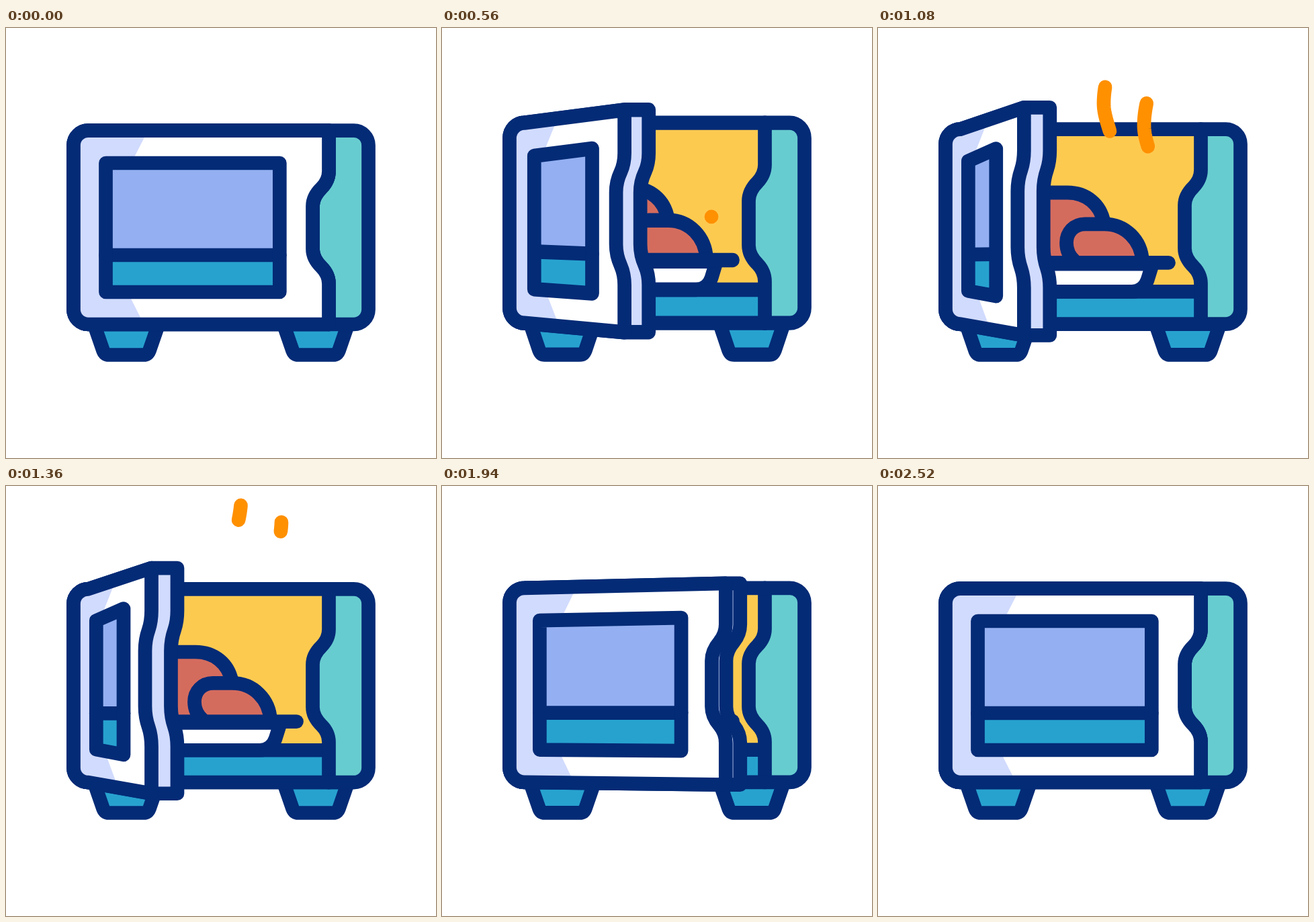
Animation of 640x640 px, one loop 2.74 s. Source, as an HTML page with a canvas:

```html
<!DOCTYPE html>
<html lang="en">
<head>
<meta charset="utf-8">
<title>Microwave</title>
<style>
html, body { margin: 0; width: 100%; height: 100%; overflow: hidden; background: #fff; }
canvas { display: block; width: 640px; height: 640px; }
</style>
</head>
<body>
<canvas id="stage" width="640" height="640"></canvas>
<script>
const ctx = document.getElementById('stage').getContext('2d');
const LOOP = 2740, GROUND = 497, STROKE = 20.7;
const LEFT = 100.5, RIGHT = 539.5, TOP = 152.6, BOTTOM = 441, RADIUS = 22;
const DOOR_WIDTH = 380, DOOR_DEPTH = 40.4;
const NAVY = '#042b76', YELLOW = '#fdca50', RED = '#d46c5e', BLUE = '#27a2cf',
  LAVENDER = '#d1dbfd', GLASS = '#94b0f2', ORANGE = '#ff9000', TEAL = '#67ccd0';

const mix = (a, b, u) => a + (b - a) * u;

// Monotone cubic interpolation through [time, value] keys
function track(keys) {
  const n = keys.length;
  const secant = i => (keys[i + 1][1] - keys[i][1]) / (keys[i + 1][0] - keys[i][0]);
  const slope = keys.map((_, i) => {
    if (i === 0 || i === n - 1) return 0;
    const a = secant(i - 1), b = secant(i);
    return a * b <= 0 ? 0 : 2 * a * b / (a + b);
  });
  return t => {
    if (t <= keys[0][0]) return keys[0][1];
    if (t >= keys[n - 1][0]) return keys[n - 1][1];
    let i = 0;
    while (t > keys[i + 1][0]) i++;
    const d = keys[i + 1][0] - keys[i][0], u = (t - keys[i][0]) / d, v = 1 - u;
    return keys[i][1] * (1 + 2 * u) * v * v + slope[i] * d * u * v * v
      + keys[i + 1][1] * u * u * (3 - 2 * u) - slope[i + 1] * d * u * u * v;
  };
}

const stretch = track([[220, 1], [390, .97], [580, 1.035], [860, .983], [1090, 1.006],
  [1360, .998], [1540, .98], [1720, 1.0225], [1820, 1.038], [2030, .98],
  [2160, 1.003], [2310, 1.012], [2520, 1]]);
const opening = track([[290, 0], [560, .79], [700, .9], [860, .96], [1150, 1],
  [1680, 1], [1720, .994], [2040, 0]]);
const edgeLag = track([[300, 0], [560, -6], [860, 6], [1150, 0]]);
const steamHead = track([[590, 0], [860, .4], [1280, .915], [1360, .96], [1400, 1]]);
const steamTail = track([[620, 0], [875, .166], [1360, .864], [1430, 1]]);

function stroke(color = NAVY) {
  ctx.strokeStyle = color;
  ctx.stroke();
}

function fill(color) {
  ctx.fillStyle = color;
  ctx.fill();
}

function polygon(...points) {
  ctx.beginPath();
  points.forEach(p => ctx.lineTo(...p));
  ctx.closePath();
}

function line(x1, y1, x2, y2) {
  ctx.beginPath();
  ctx.moveTo(x1, y1);
  ctx.lineTo(x2, y2);
  stroke();
}

// Wavy vertical edge, drawn downwards from the current point
function wave(x, bottom, bend, rise, drop) {
  const y1 = 213 - .9 * rise, y2 = 265 - .65 * rise;
  const y3 = 329 - .1 * drop, y4 = 381 + .4 * drop;
  const h = y2 - y1, k = y4 - y3;
  ctx.lineTo(x, y1);
  ctx.bezierCurveTo(x, y1 + .25 * h, x - .28 * bend, y1 + .4 * h, x - .45 * bend, y1 + .48 * h);
  ctx.bezierCurveTo(x - .83 * bend, y1 + .65 * h, x - bend, y1 + .82 * h, x - bend, y2);
  ctx.lineTo(x - bend, y3);
  ctx.bezierCurveTo(x - bend, y4 - .82 * k, x - .83 * bend, y4 - .65 * k, x - .45 * bend, y4 - .48 * k);
  ctx.bezierCurveTo(x - .28 * bend, y4 - .4 * k, x, y4 - .25 * k, x, y4);
  ctx.lineTo(x, bottom);
}

function drawFoot(x) {
  ctx.beginPath();
  ctx.moveTo(x + 131, 441);
  ctx.lineTo(x + 144.5, 480);
  ctx.quadraticCurveTo(x + 147, 486.5, x + 153, 486.5);
  ctx.lineTo(x + 205, 486.5);
  ctx.quadraticCurveTo(x + 211, 486.5, x + 213.5, 480);
  ctx.lineTo(x + 227, 441);
  fill(BLUE);
  stroke();
}

function drawFood() {
  ctx.beginPath();
  ctx.moveTo(200, 350);
  ctx.lineTo(200, 246.5);
  ctx.lineTo(282, 246.5);
  ctx.bezierCurveTo(310, 246.5, 331, 264, 336, 290);
  ctx.lineTo(330, 350);
  fill(RED);
  ctx.beginPath();
  ctx.moveTo(200, 246.5);
  ctx.lineTo(282, 246.5);
  ctx.bezierCurveTo(310, 246.5, 331, 264, 336, 290);
  stroke();

  ctx.beginPath();
  ctx.moveTo(293, 348);
  ctx.bezierCurveTo(285, 341, 280.5, 332, 280.5, 321);
  ctx.bezierCurveTo(280.5, 305, 292, 293, 308, 293);
  ctx.lineTo(337, 293);
  ctx.bezierCurveTo(368, 293, 392, 317, 393.5, 348);
  fill(RED);
  stroke();

  ctx.beginPath();
  ctx.moveTo(200, 352);
  ctx.lineTo(408.5, 352);
  ctx.lineTo(401, 376);
  ctx.quadraticCurveTo(395, 393, 378, 393);
  ctx.lineTo(200, 393);
  fill('#fff');
  stroke();
  line(200, 350.3, 432.5, 350.3);
}

function bodyPath() {
  ctx.beginPath();
  ctx.roundRect(LEFT, TOP, RIGHT - LEFT, BOTTOM - TOP, RADIUS);
}

function drawBody() {
  const divider = LEFT + DOOR_WIDTH;
  bodyPath();
  fill(YELLOW);
  ctx.save();
  ctx.clip();
  ctx.fillStyle = BLUE;
  ctx.fillRect(LEFT, 393, DOOR_WIDTH, 50);
  drawFood();
  line(LEFT, 393, divider, 393);
  ctx.beginPath();
  ctx.moveTo(divider, TOP);
  wave(divider, BOTTOM, 24, 0, 0);
  ctx.lineTo(RIGHT, BOTTOM);
  ctx.lineTo(RIGHT, TOP);
  fill(TEAL);
  ctx.restore();
  ctx.beginPath();
  ctx.moveTo(divider, TOP);
  wave(divider, BOTTOM, 24, 0, 0);
  stroke();
  bodyPath();
  stroke();
}

function drawWindow(q, rise, drop, lag) {
  const x1 = mix(148.5, 134.3, q), x2 = mix(407.3, 175, q);
  const topLeft = [x1, 201 - .04 * rise], topRight = [x2, 201 - .61 * rise];
  const barLeft = [x1, 338], barRight = [x2, 338 - .55 * lag];
  const bottomLeft = [x1, 393 - q], bottomRight = [x2, 393 + .4 * drop];
  polygon(topLeft, topRight, barRight, barLeft);
  fill(GLASS);
  polygon(barLeft, barRight, bottomRight, bottomLeft);
  fill(BLUE);
  line(...barLeft, ...barRight);
  polygon(topLeft, topRight, bottomRight, bottomLeft);
  stroke();
}

function drawDoor(t) {
  const q = opening(t), lag = edgeLag(t);
  const width = mix(DOOR_WIDTH, 116, q);
  const depth = DOOR_DEPTH * Math.sqrt(Math.max(0, 1 - (width / DOOR_WIDTH) ** 2));
  const rise = 31.3 * q + lag, drop = 16.7 * q, bend = 24 - 14.5 * q;
  const edge = LEFT + width, top = TOP - rise, bottom = BOTTOM + drop;

  const slab = right => {
    ctx.beginPath();
    ctx.moveTo(right, top);
    wave(right, bottom, bend, rise, drop);
    ctx.lineTo(edge, bottom);
    ctx.arc(LEFT + RADIUS, BOTTOM - RADIUS, RADIUS, Math.PI / 2, Math.PI);
    ctx.arc(LEFT + RADIUS, TOP + RADIUS, RADIUS, Math.PI, Math.PI * 1.5);
    ctx.lineTo(edge, top);
    ctx.closePath();
  };

  slab(edge + depth);
  fill(LAVENDER);
  stroke();
  slab(edge);
  fill('#fff');
  ctx.save();
  ctx.clip();
  polygon([90, 130], [mix(223, 167, q), 130], [mix(191.5, 143, q), 191],
    [mix(186, 150, q), 403], [mix(215, 171, q), 460], [90, 460]);
  fill(LAVENDER);
  ctx.restore();
  slab(edge);
  stroke();
  drawWindow(q, rise, drop, lag);
}

const BENDS = [[281, 401], [262, 399], [212, 409], [145, 396], [50, 410]];
function steamX(y) {
  let i = 0;
  while (i < BENDS.length - 2 && y < BENDS[i + 1][0]) i++;
  const [y1, x1] = BENDS[i], [y2, x2] = BENDS[i + 1];
  return mix(x1, x2, (1 - Math.cos(Math.PI * (y - y1) / (y2 - y1))) / 2);
}

function drawSteam(t, dx, dy) {
  if (t < 575 || t >= 1430) return;
  const tail = mix(281, 53, steamTail(t)), head = mix(281, 53, steamHead(t)) - .1;
  ctx.beginPath();
  for (let i = 0; i <= 24; i++) {
    const y = mix(tail, head, i / 24);
    ctx.lineTo(steamX(y) + dx, y + dy);
  }
  stroke(ORANGE);
}

function scaled(s, draw) {
  ctx.save();
  ctx.translate(0, GROUND);
  ctx.scale(1, s);
  ctx.translate(0, -GROUND);
  draw();
  ctx.restore();
}

function render(t) {
  const s = stretch(t);
  ctx.fillStyle = '#fff';
  ctx.fillRect(0, 0, 640, 640);
  ctx.lineWidth = STROKE;
  ctx.lineCap = ctx.lineJoin = 'round';
  scaled(s, () => {
    drawFoot(0);
    drawFoot(282);
    drawBody();
  });
  drawSteam(t, -60, -33);
  drawSteam(t + 30, 0, 0);
  scaled(s, () => drawDoor(t));
}

const start = performance.now();
function tick() {
  render((performance.now() - start) % LOOP);
  requestAnimationFrame(tick);
}
tick();
</script>
</body>
</html>
```
